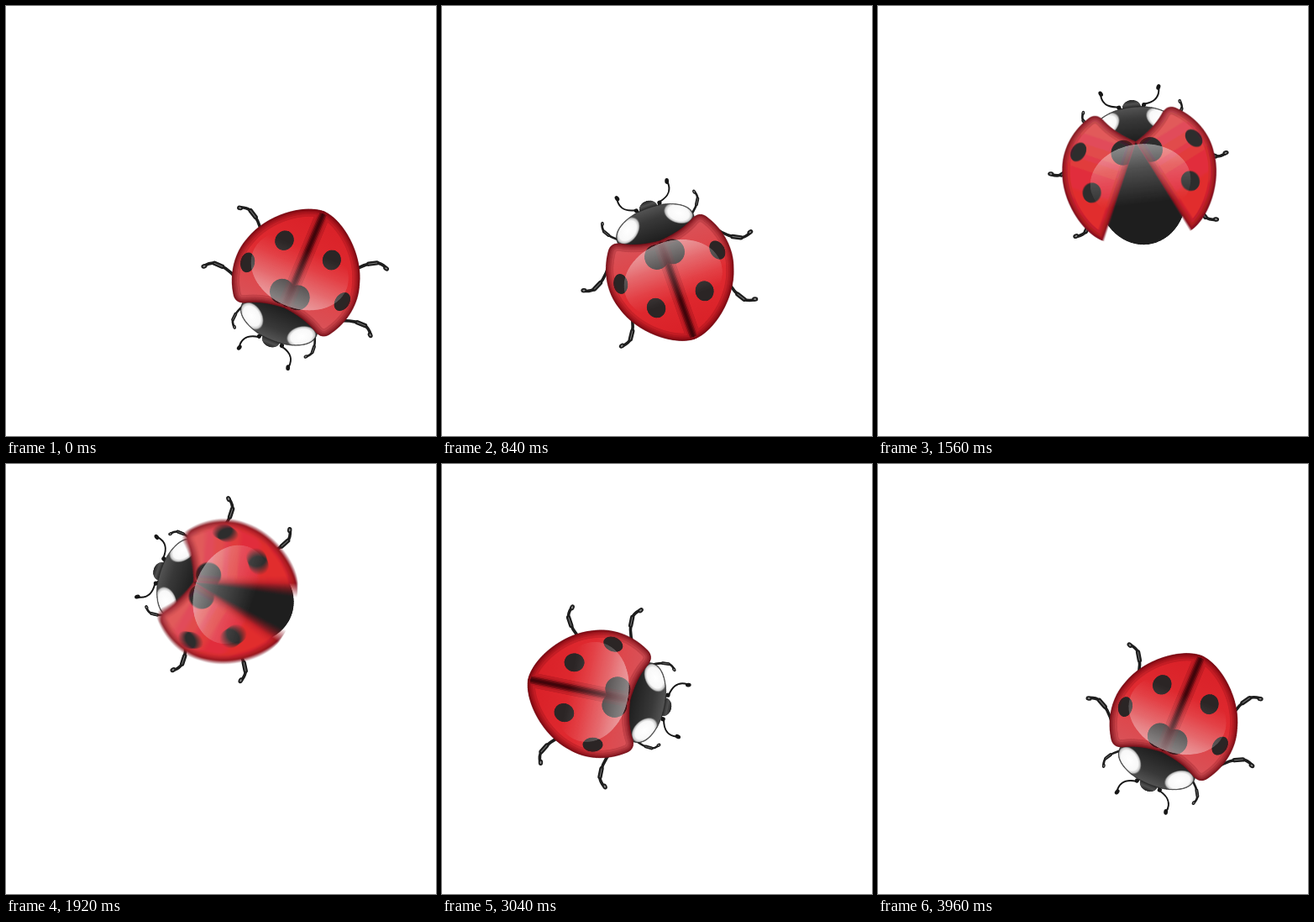
Animation of 512 by 512 pixels, one loop 4 s. Source, as an HTML page with a canvas:

```html
<!DOCTYPE html>
<html lang="en">
<head>
<meta charset="utf-8">
<title>Ladybird</title>
<style>
html, body { margin: 0; width: 100%; height: 100%; overflow: hidden; background: #fff; }
canvas { display: block; width: 100vw; height: 100vh; }
</style>
</head>
<body>
<canvas id="stage" width="512" height="512"></canvas>
<script>
const ctx = document.getElementById('stage').getContext('2d');
const STEP = 40, STEPS = 100, TAU = Math.PI * 2, RAD = Math.PI / 180;

// The beetle steers through these points and always faces along its path
const point = (step, x, y, heading, speed) => ({
  step, x, y, vx: speed * Math.cos(heading * RAD), vy: speed * Math.sin(heading * RAD)
});
const ROUTE = [
  point(0, 350.5, 313, 112.5, 19),
  point(12, 304.5, 372, 243, 13),
  point(30, 295, 294, 298, 10),
  point(48, 271, 156, 198, 9),
  point(60, 196, 203, 136, 12),
  point(76, 175, 271, 11.5, 13),
  point(87, 330, 226, 5, 13)
];
ROUTE.push({ ...ROUTE[0], step: STEPS });

function pose(step) {
  const i = ROUTE.findIndex(p => p.step > step);
  const a = ROUTE[i - 1], b = ROUTE[i], span = b.step - a.step;
  const u = (step - a.step) / span, v = 1 - u;
  const place = (p, q, m, n) =>
    p * v * v * (1 + 2 * u) + q * u * u * (1 + 2 * v) + span * u * v * (m * v - n * u);
  const rate = (p, q, m, n) =>
    6 * u * v * (q - p) / span + m * v * (1 - 3 * u) + n * u * (1 - 3 * v);
  const dx = rate(a.x, b.x, a.vx, b.vx), dy = rate(a.y, b.y, a.vy, b.vy);
  return {
    x: place(a.x, b.x, a.vx, b.vx),
    y: place(a.y, b.y, a.vy, b.vy),
    turn: Math.atan2(dy, dx) + Math.PI / 2
  };
}

function oval(g, x, y, rx, ry, angle, fill) {
  g.beginPath();
  g.ellipse(x, y, rx, ry, angle * RAD, 0, TAU);
  g.fillStyle = fill;
  g.fill();
}

function shade(grad, stops) {
  stops.forEach(([at, color]) => grad.addColorStop(at, color));
  return grad;
}
const fade = (g, from, to, stops) => shade(g.createLinearGradient(0, from, 0, to), stops);
const glow = (g, r, stops) => shade(g.createRadialGradient(0, 0, 0, 0, 0, r), stops);

// Runs a painter for the right half, then mirrored for the left
function bothSides(g, paint) {
  for (const side of [1, -1]) {
    g.save();
    g.scale(side, 1);
    paint(side);
    g.restore();
  }
}

// Sprites are drawn at double size with the wing hinge at (HX, HY)
const SIZE = 360, HX = 180, HY = 120;
function sprite(paint) {
  const c = document.createElement('canvas');
  c.width = c.height = SIZE * 2;
  const g = c.getContext('2d');
  g.scale(2, 2);
  g.translate(HX, HY);
  paint(g);
  return c;
}
const stamp = (g, s) => g.drawImage(s, -HX, -HY, SIZE, SIZE);

const wingShape = new Path2D(
  'M0 0 Q26 -2 43 -11 Q56 -19 63 -7 C76 13 80 38 72 60 C62 94 26 123 0 124 Z');

const wing = sprite(g => {
  g.save();
  g.clip(wingShape);
  g.fillStyle = fade(g, -16, 124,
    [[0, '#d8555b'], [0.25, '#dd484d'], [0.5, '#e02b31'], [1, '#d81f26']]);
  g.fillRect(-5, -30, 100, 170);
  const spot = '#2b2525';
  oval(g, 10, 17, 14.5, 15, 0, spot);
  oval(g, 61, 33, 8.5, 12, -12, spot);
  oval(g, 30.5, 74, 11, 12, 10, spot);
  for (let w = 18; w > 2; w *= 0.68) {
    g.lineWidth = w;
    g.strokeStyle = 'rgba(95,0,12,.19)';
    g.stroke(wingShape);
  }
  g.restore();
  g.lineWidth = 1;
  g.strokeStyle = 'rgba(110,10,20,.5)';
  g.stroke(wingShape);
});

// Both wings spread by an angle, averaged over a smear of nearby angles
function wingPair(angle, smear) {
  const n = smear ? 15 : 1;
  return sprite(g => {
    bothSides(g, () => stamp(g, sprite(h => {
      h.globalCompositeOperation = 'lighter';
      h.globalAlpha = 1 / n;
      for (let k = 0; k < n; k++) {
        h.save();
        h.rotate(-(angle + ((k + 0.5) / n - 0.5) * smear) * RAD);
        stamp(h, wing);
        h.restore();
      }
    })));
    if (angle) return;
    g.strokeStyle = 'rgba(30,0,4,.28)';
    for (let w = 9; w > 2; w -= 3) {
      g.lineWidth = w;
      g.beginPath();
      g.moveTo(0, 2);
      g.lineTo(0, 121);
      g.stroke();
    }
  });
}
const CLOSED = { wings: wingPair(0, 0), splay: 2 };
const HALF = { wings: wingPair(13.5, 8), splay: 18 };
const OPEN = { wings: wingPair(25.2, 1.5), splay: 10 };
const BEAT = [CLOSED, HALF, OPEN];

const collar = new Path2D('M-48 -14 C-50 -31 -25 -41.5 0 -41.5 C25 -41.5 50 -31 48 -14 Q30 0 0 4 Q-30 0 -48 -14 Z');

const torso = sprite(g => {
  oval(g, 0, -41.5, 11, 8.5, 0, fade(g, -50, -38, [[0, '#222'], [0.4, '#505050'], [1, '#161616']]));
  g.save();
  g.clip(collar);
  g.fillStyle = fade(g, -42, 2, [[0, '#555'], [0.35, '#383838'], [1, '#1c1c1c']]);
  g.fillRect(-55, -50, 110, 60);
  bothSides(g, () => {
    g.translate(32, -24);
    g.rotate(36 * RAD);
    g.scale(1, 0.68);
    oval(g, 0, 0, 18, 18, 0, glow(g, 18,
      [[0, '#fff'], [0.72, '#f8f8f8'], [0.9, '#c4c4c4'], [1, 'rgba(120,120,120,.3)']]));
  });
  g.restore();
  g.lineWidth = 1.3;
  g.strokeStyle = 'rgba(40,40,40,.75)';
  g.stroke(collar);
  oval(g, 0, 62, 53, 61, 0, '#1e1e1e');
});

const gloss = sprite(g => {
  oval(g, 0, 48, 60, 45, 0, fade(g, 3, 74,
    [[0, 'rgba(255,255,255,.46)'], [0.4, 'rgba(255,255,255,.22)'], [1, 'rgba(255,255,255,0)']]));
});

function drawAntennae(splay) {
  const ink = '#161616';
  bothSides(ctx, () => {
    ctx.translate(13, -40);
    ctx.rotate(splay * RAD);
    ctx.strokeStyle = ink;
    ctx.lineWidth = 2;
    ctx.beginPath();
    ctx.moveTo(-1, 0);
    ctx.lineTo(2, -4);
    ctx.bezierCurveTo(10, -6, 20, -10, 18, -24);
    ctx.stroke();
    oval(ctx, 1.5, -3, 2.6, 2.6, 0, ink);
    oval(ctx, 17.5, -25, 2.4, 3.4, 15, ink);
  });
}

// One leg shape, placed at three hinges
function drawLeg(x, y, angle, scale) {
  const ink = '#1d1d1d';
  ctx.save();
  ctx.translate(x, y);
  ctx.rotate(angle * RAD);
  ctx.scale(scale, scale);
  ctx.strokeStyle = ink;
  ctx.lineWidth = 3.6;
  ctx.beginPath();
  ctx.moveTo(-6, -3);
  ctx.quadraticCurveTo(12, 6, 26, 4);
  ctx.quadraticCurveTo(31, 3, 36, -3);
  ctx.stroke();
  ctx.beginPath();
  ctx.moveTo(16, 4);
  ctx.lineTo(26, 4);
  ctx.lineWidth = 5.4;
  ctx.stroke();
  ctx.strokeStyle = '#777';
  ctx.lineWidth = 1;
  ctx.stroke();
  oval(ctx, 36, -4, 3.6, 2.7, -40, ink);
  oval(ctx, 36, -4, 1.6, 1, -40, '#888');
  ctx.restore();
}

function drawLegs(swing) {
  bothSides(ctx, () => {
    drawLeg(47, -18, swing - 86, 0.72);
    drawLeg(71, 13, swing, 1);
    drawLeg(61, 75, swing + 30, 1);
  });
}

// Nine wing beats per loop, each held closed, half open and open
function beatAt(step) {
  const hold = STEPS / 27;
  return BEAT[Math.floor((step - 0.55) / hold + 1) % 3];
}

function draw(step) {
  const { x, y, turn } = pose(step), beat = beatAt(step);
  ctx.clearRect(0, 0, 512, 512);
  ctx.lineCap = ctx.lineJoin = 'round';
  ctx.save();
  ctx.translate(x, y);
  ctx.rotate(turn);
  ctx.translate(0, -50);
  drawLegs(27 * (1 - Math.cos(step * TAU / 4)));
  drawAntennae(beat.splay);
  stamp(ctx, torso);
  stamp(ctx, beat.wings);
  stamp(ctx, gloss);
  ctx.restore();
}

const start = performance.now();
function tick() {
  draw(Math.floor((performance.now() - start) / STEP) % STEPS);
  requestAnimationFrame(tick);
}
tick();
</script>
</body>
</html>
```
